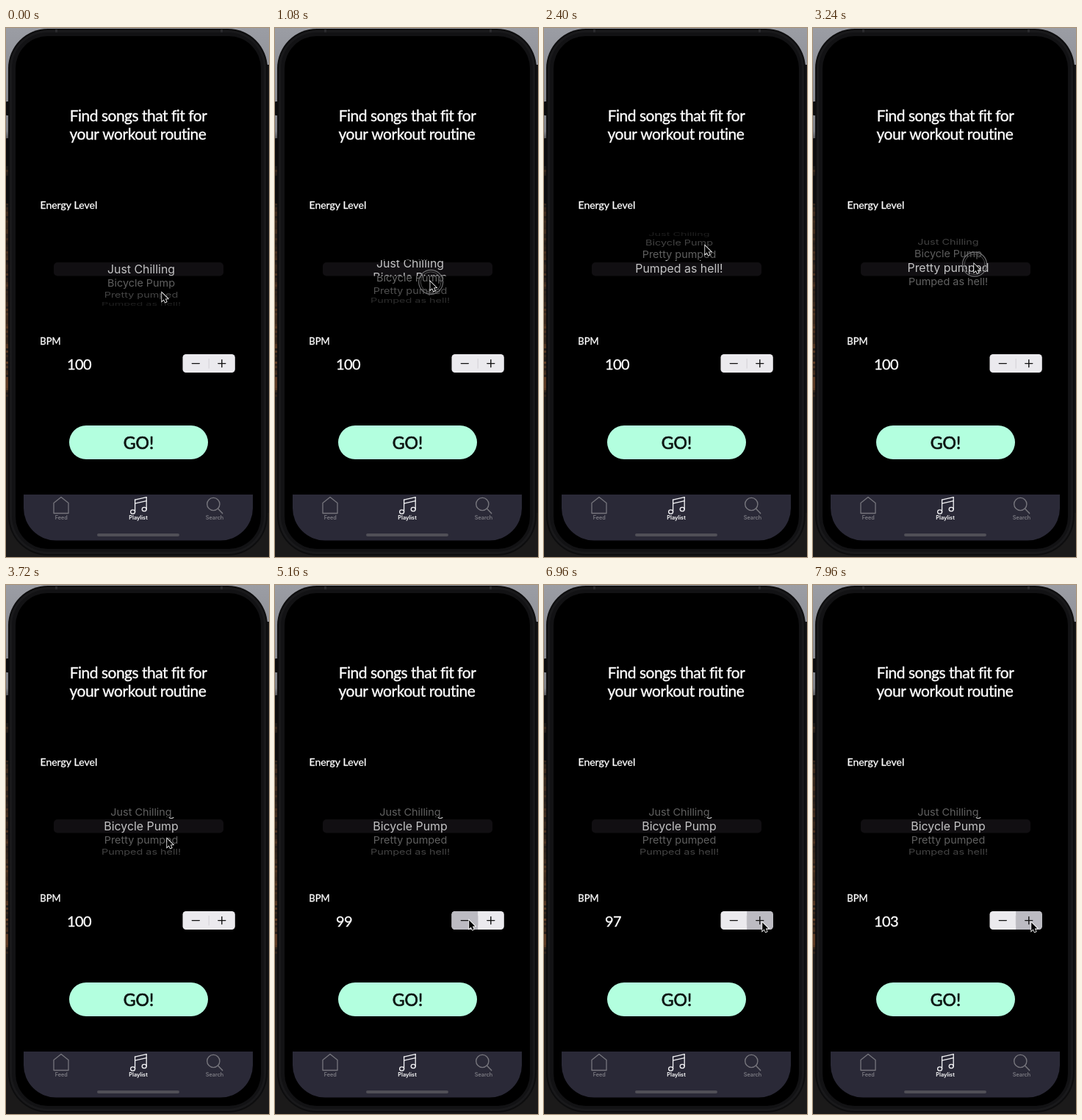
These frames come from a looping animation (358x720 px, 8000 ms). An HTML page with a canvas:

```html
<!DOCTYPE html>
<html lang="en">
<head>
<meta charset="utf-8">
<title>Workout playlist</title>
<style>
  html, body { margin: 0; width: 100%; height: 100%; overflow: hidden; background: #000; }
  canvas { display: block; width: 358px; height: 720px; }
</style>
</head>
<body>
<canvas id="stage"></canvas>
<script>
const W = 358, H = 720, LOOP = 8000;
const canvas = document.getElementById('stage');
const ctx = canvas.getContext('2d');
const dpr = window.devicePixelRatio || 1;
canvas.width = W * dpr;
canvas.height = H * dpr;

const GEO = 'Lato, sans-serif';
const UI = 'Inter, sans-serif';

const LEVELS = ['Just Chilling', 'Bicycle Pump', 'Pretty pumped', 'Pumped as hell!'];
const WHEEL = { x: 184, y: 328, radius: 53.5, step: 0.36, rowHeight: 18.3, slack: 8 };
const BAND = { x: 65, y: 319, w: 231, h: 18.5 };

const START = { x: 211.5, y: 359.5 };
const MOVES = [
  { from: 480, to: 1280, dx: -1, dy: -18 },
  { from: 1320, to: 2160, dx: 8, dy: -46 },
  { from: 3000, to: 3480, dx: 0, dy: 49 },
  { from: 4240, to: 4800, dx: 45, dy: 111 },
  { from: 5920, to: 6200, dx: 33, dy: 3 },
];
const DRAGS = [{ from: 40, to: 2280 }, { from: 2900, to: 3490 }];
const MINUS = { from: 5000, every: 165, count: 6 };
const PLUS = { from: 6460, every: 175, count: 9 };
const TAP = 50, RELEASE = 40;

const clamp = (v, a = 0, b = 1) => Math.min(b, Math.max(a, v));
const ease = p => { p = clamp(p); return p * p * (3 - 2 * p); };

function cursorAt(t) {
  const pos = { ...START };
  for (const m of MOVES) {
    const p = ease((t - m.from) / (m.to - m.from));
    pos.x += m.dx * p;
    pos.y += m.dy * p;
  }
  return pos;
}

// Dragging turns the wheel; letting go settles it on the nearest row
function wheelAt(t) {
  let pos = 0;
  for (const { from, to } of DRAGS) {
    if (t < from) break;
    const dy = cursorAt(from).y - cursorAt(Math.min(t, to)).y;
    pos += Math.sign(dy) * Math.max(0, Math.abs(dy) - WHEEL.slack) / WHEEL.rowHeight;
    pos += (Math.round(pos) - pos) * (t > to ? ease((t - to) / 230) : 0);
  }
  return pos;
}

const clicksDone = (c, t) => clamp(Math.floor((t - c.from) / c.every) + 1, 0, c.count);
const lastClick = (c, t) => c.from + (clicksDone(c, t) - 1) * c.every;

function box(x, y, w, h, r, fill) {
  ctx.beginPath();
  ctx.roundRect(x, y, w, h, r);
  ctx.fillStyle = fill;
  ctx.fill();
}

function ring(x, y, r, color, width) {
  ctx.beginPath();
  ctx.arc(x, y, r, 0, Math.PI * 2);
  ctx.strokeStyle = color;
  ctx.lineWidth = width;
  ctx.stroke();
}

function poly(points, color, width, close) {
  ctx.beginPath();
  points.forEach(([x, y], i) => i ? ctx.lineTo(x, y) : ctx.moveTo(x, y));
  if (close) ctx.closePath();
  ctx.strokeStyle = color;
  ctx.lineWidth = width;
  ctx.stroke();
}

function text(str, x, y, font, { color = '#fff', align = 'left', spacing = 0, bold = 0 } = {}) {
  ctx.font = font;
  ctx.textAlign = align;
  ctx.textBaseline = 'alphabetic';
  ctx.letterSpacing = spacing + 'px';
  ctx.fillStyle = ctx.strokeStyle = color;
  ctx.fillText(str, x, y);
  if (bold) {
    ctx.lineWidth = bold;
    ctx.lineJoin = 'round';
    ctx.strokeText(str, x, y);
  }
}

function drawPhone() {
  const wall = ctx.createLinearGradient(0, 0, 0, 165);
  wall.addColorStop(0, '#9b9da4');
  wall.addColorStop(0.85, '#808288');
  wall.addColorStop(1, '#1b1a1a');
  ctx.fillStyle = wall;
  ctx.fillRect(0, 0, W, H);

  // Speckled warm texture along the left edge
  let seed = 7;
  const random = () => (seed = seed * 16807 % 2147483647) / 2147483647;
  for (let y = 190; y < 500; y += 3) {
    const glow = random() * (y / 500);
    ctx.fillStyle = `rgb(${28 + 75 * glow}, ${25 + 40 * glow}, ${23 + 15 * glow})`;
    ctx.fillRect(0, y, 4, 3);
  }
  ctx.fillStyle = '#141416';
  ctx.fillRect(355, 50, 3, 610);
  for (const [y, h] of [[100, 19], [150, 38], [201, 38]]) box(0, y, 5, h, 1, '#0d0d0f');

  box(3, 1, 353, 717, 54, '#0d0d0e');
  box(5, 3, 349, 713, 52, '#19191b');
  box(8, 6, 343, 707, 49, '#121214');
  box(13, 11, 334, 698, 44, '#000');
  ctx.fillStyle = '#29292c';
  for (const x of [67, 292]) ctx.fillRect(x, 2, 3, 4);
}

function drawNote(x, y, top) {
  poly([[x, y], [x, top]], '#f4f4f6', 1.3);
  ctx.beginPath();
  ctx.ellipse(x - 3, y, 3, 2.7, 0, 0, Math.PI * 2);
  ctx.stroke();
}

function drawTabs() {
  box(24, 635, 312, 62.5, [0, 0, 44, 44], '#2a2937');
  ctx.lineJoin = ctx.lineCap = 'round';
  const grey = '#77767d';

  poly([[75, 638.5], [85, 646.5], [85, 660.5], [65, 660.5], [65, 646.5]], grey, 1.3, true);
  ring(282.3, 648, 8.6, grey, 1.4);
  poly([[288.5, 654.2], [294.6, 660.6]], grey, 1.5);

  drawNote(175.6, 658.5, 642.2);
  drawNote(191.2, 655, 638.6);
  for (const y of [642.2, 647.2]) poly([[175.6, y], [191.2, y - 3.6]], '#f4f4f6', 1.3);

  const label = { color: '#85848b', align: 'center' };
  text('Feed', 75.3, 669, '500 7.3px ' + UI, label);
  text('Playlist', 180, 669, '600 7.3px ' + UI, { align: 'center' });
  text('Search', 284, 669, '500 7.3px ' + UI, label);
  box(124, 688, 112, 4, 2, '#504f57');
}

function drawRows(pos, size, top, bottom, color) {
  ctx.save();
  ctx.beginPath();
  ctx.rect(BAND.x, top, BAND.w, bottom - top);
  ctx.clip();
  LEVELS.forEach((label, i) => {
    const angle = (i - pos) * WHEEL.step;
    const cos = Math.cos(angle);
    ctx.save();
    ctx.translate(WHEEL.x, WHEEL.y + WHEEL.radius * Math.sin(angle));
    ctx.scale(1, cos);
    text(label, 0, size * 0.36, `400 ${size}px ${UI}`, { color: color(cos), align: 'center' });
    ctx.restore();
  });
  ctx.restore();
}

function drawWheel(pos) {
  const dim = cos => `rgba(255,255,255,${0.42 * Math.pow(cos, 1.6)})`;
  const top = BAND.y - 3, bottom = BAND.y + BAND.h;
  box(BAND.x, BAND.y, BAND.w, BAND.h, 5, '#110f12');
  drawRows(pos, 14.4, 277, top, dim);
  drawRows(pos, 14.4, bottom, 378, dim);
  drawRows(pos, 15.9, top, bottom, () => '#c3c3c4');
}

function drawStepper(t) {
  box(240.5, 444, 71.3, 25, 4.5, '#ebeaee');
  ctx.fillStyle = '#cfced3';
  ctx.fillRect(275.7, 450, 0.9, 13.5);
  const press = (clicks, x, corners) => {
    if (!clicksDone(clicks, t)) return;
    const level = clamp((lastClick(clicks, t) + 320 - t) / 120);
    box(x, 444, 35.6, 25, corners, `rgba(188,187,194,${level})`);
  };
  press(MINUS, 240.5, [4.5, 0, 0, 4.5]);
  press(PLUS, 276.2, [0, 4.5, 4.5, 0]);
  ctx.lineCap = 'round';
  poly([[253.3, 456.6], [263.3, 456.6]], '#111', 1.4);
  poly([[288.8, 456.6], [298.8, 456.6]], '#111', 1.4);
  poly([[293.8, 451.6], [293.8, 461.6]], '#111', 1.4);
}

function drawTouch({ x, y }, t) {
  const taps = [MINUS, PLUS].map(c => lastClick(c, t)).map(from => ({ from, to: from + TAP }));
  const touch = [...DRAGS, ...taps].find(d => t >= d.from && t < d.to + RELEASE);
  if (!touch) return;
  const p = clamp((t - touch.from) / 80);
  const r = 20 - 3.5 * p;
  ctx.globalAlpha = Math.min(0.35 + 0.65 * p, clamp((touch.to + RELEASE - t) / RELEASE));
  ring(x + 1.5, y + 1.5, r, '#6f6f71', 1.2);
  ring(x + 1.5, y + 1.5, r - 2.6, '#58585a', 0.9);
  ctx.globalAlpha = 1;
}

function drawCursor({ x, y }) {
  ctx.save();
  ctx.translate(x + 0.7, y + 0.7);
  ctx.lineJoin = 'miter';
  poly([[0, 0], [0, 11.6], [2.6, 9.2], [4.4, 13.2], [6.4, 12.3], [4.6, 8.4], [8.2, 8.2]],
    '#fff', 1.6, true);
  ctx.fillStyle = '#000';
  ctx.fill();
  ctx.restore();
}

function draw(t) {
  ctx.setTransform(dpr, 0, 0, dpr, 0, 0);
  drawPhone();

  const title = { align: 'center', spacing: -0.5, bold: 0.35 };
  text('Find songs that fit for', 180, 127, '400 21px ' + GEO, title);
  text('your workout routine', 179.5, 152, '400 21px ' + GEO, title);
  text('Energy Level', 46.5, 246, '400 14px ' + GEO, { bold: 0.3 });
  text('BPM', 46.3, 431, '400 13px ' + GEO, { bold: 0.3 });

  const bpm = 100 - clicksDone(MINUS, t) + clicksDone(PLUS, t);
  text(String(bpm), 83, 465, '400 20px ' + GEO, { spacing: -0.6, bold: 0.3 });

  drawWheel(wheelAt(t));
  drawStepper(t);
  box(86, 541, 189, 46, 23, '#b3ffdf');
  text('GO!', 180.5, 573, '400 23px ' + GEO,
    { color: '#0c1411', align: 'center', bold: 0.7 });
  drawTabs();

  const cursor = cursorAt(t);
  drawTouch(cursor, t);
  drawCursor(cursor);
}

const begin = performance.now();
function tick() {
  draw((performance.now() - begin) % LOOP);
  requestAnimationFrame(tick);
}
tick();
</script>
</body>
</html>
```
